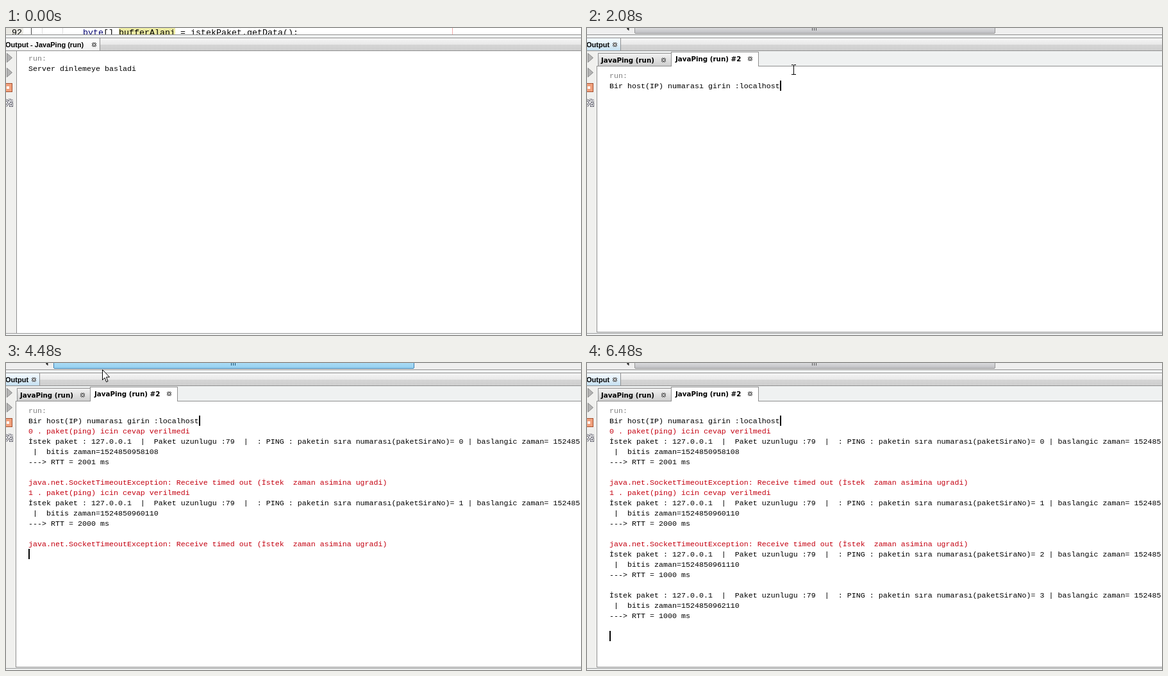
Write an HTML page with a canvas that moves like this. It is 897x479 px and loops after 8 s.

```html
<!DOCTYPE html>
<html lang="tr">
<head>
<meta charset="utf-8">
<title>Ping console</title>
<style>
html, body { margin: 0; width: 100%; height: 100%; overflow: hidden; background: #fff; }
canvas { display: block; }
</style>
</head>
<body>
<canvas id="stage" width="897" height="479"></canvas>
<script>
const c = document.getElementById('stage').getContext('2d');
const LOOP = 8000, W = 897, H = 479;
const MONO = '"Liberation Mono", "Courier New", monospace';
const CODE = '11.66px ' + MONO;
const TITLE = 'bold 11px "Liberation Sans", Arial, sans-serif';
const TAB = 'bold 10.3px "DejaVu Sans", sans-serif';
const RED = '#c40010', GRAY = '#808080';
const PROMPT = 'Bir host(IP) numarası girin :', HOST = 'localhost';

// Each track is a list of [start time, value...]; the last started entry holds.
const typed = [[0, 0], [520, 2], [600, 4], [710, 6], [810, 8], [890, 9]];
const caret = [[0, -1], [1120, 2], [1380, -1], [2550, 8], [3020, -1], [3550, 8],
  [4020, -1], [4480, 14], [5020, -1], [5480, 18], [6020, -1], [6480, 22]];
const heat = [[0, 0], [2940, .1], [3020, .4], [3090, .7], [3170, 1], [3780, .66], [4020, .33],
  [4240, 0], [4410, .6], [4480, 1], [4640, .6], [4720, .3], [4790, 0],
  [5180, .5], [5250, 1], [5480, .6], [5710, .1], [5860, 0]];
const pointer = [[0], [180, beam, 422, 67], [290, beam, 392, 82], [370, beam, 345, 107],
  [450, beam, 306, 121], [1300, beam, 307, 105], [1380, beam, 308, 88], [1700, beam, 309, 84],
  [1780, beam, 309, 76], [1850, beam, 310, 70], [2080, beam, 322, 65], [2150, beam, 362, 45],
  [2230, resize, 420, 15], [2300, resize, 441, 15], [2940, arrow, 455, 8], [3320],
  [4410, arrow, 165, 1], [4480, arrow, 150, 10], [4560, arrow, 128, 19], [4640, arrow, 108, 29],
  [4720, arrow, 96, 36], [4790, arrow, 90, 40], [4870, arrow, 88, 41], [5180, arrow, 96, 12], [5250]];
const packets = [
  [2480, 2, 1524850958108, 2001], [4480, 8, 1524850960110, 2000],
  [5480, 14, 1524850961110, 1000], [6250, 18, 1524850962110, 1000]];

const now = (track, t) => track.filter(k => k[0] <= t).pop();

function box(x, y, w, h, fill) {
  c.fillStyle = fill;
  c.fillRect(x, y, w, h);
}

function shade(x, y, w, h, ...colors) {
  const g = c.createLinearGradient(0, y, 0, y + h);
  colors.forEach((k, i) => g.addColorStop(i / (colors.length - 1), k));
  box(x, y, w, h, g);
}

function text(s, x, y, color = '#000', font = CODE) {
  c.font = font;
  c.fillStyle = color;
  c.fillText(s, x, y);
}

function line(color, width, ...p) {
  c.beginPath();
  for (let i = 0; i < p.length; i += 2) c.lineTo(p[i], p[i + 1]);
  c.strokeStyle = color;
  c.lineWidth = width;
  c.stroke();
}

function poly(fill, stroke, ...p) {
  c.beginPath();
  for (let i = 0; i < p.length; i += 2) c.lineTo(p[i], p[i + 1]);
  c.closePath();
  c.fillStyle = fill;
  c.fill();
  c.strokeStyle = stroke;
  c.lineWidth = 1;
  c.stroke();
}

function beam(x, y) {
  box(x, y - 7, 1, 15, '#000');
  for (const dy of [-8, 7]) {
    box(x - 3, y + dy, 3, 1, '#000');
    box(x + 1, y + dy, 3, 1, '#000');
  }
}

function arrow(x, y) {
  poly('#fff', '#000', x + .5, y + .5, x + .5, y + 16.5, x + 4, y + 13, x + 6.5, y + 19.5,
    x + 9, y + 18.5, x + 6.5, y + 12, x + 11.5, y + 12);
}

function resize(x, y) {
  poly('#fff', '#000', x, y - 10.5, x + 4, y - 6, x + 1.5, y - 6, x + 1.5, y + 6, x + 4, y + 6,
    x, y + 10.5, x - 4, y + 6, x - 1.5, y + 6, x - 1.5, y - 6, x - 4, y - 6);
}

function closeMark(x, y) {
  x += .5;
  for (const [color, w, r] of [['#333', 3.2, 2.6], ['#f4f4f4', 1.1, 2.4]]) {
    line(color, w, x - r, y - r, x + r, y + r);
    line(color, w, x + r, y - r, x - r, y + r);
  }
}

function toolbar(edge) {
  box(0, 36, edge, 440, '#f0f0ee');
  for (const y of [46.5, 69.5]) poly('#b4b4b4', '#8a8a8a', 1.5, y - 7, 9.5, y, 1.5, y + 7);
  box(0, 86, 10, 14, '#a5502f');
  box(0, 87, 9, 12, '#f0a07c');
  box(1, 91, 4, 4, '#fff');
  for (const [color, w] of [['#4a4a58', 3], ['#fff', 1.3]]) {
    line(color, w, 0, 122, 6, 114, 6, 110);
    line(color, w, 6, 114, 11, 113);
    line(color, w, 0, 112, 6, 117);
    c.strokeRect(6.5, 117.5, 3, 4);
  }
}

// Strip with the window title
function header(tabEnd, title, closeX, focused) {
  box(0, 10, W, 1, '#929292');
  box(0, 11, W, 4, '#f0f2f2');
  box(0, 15, W, 1, '#8f8f8f');
  shade(0, 16, W, 10, '#f5f5f5', '#e8e8e8');
  shade(0, 26, W, 9, '#d5d5d5', '#cfcfcf');
  if (focused) shade(0, 16, tabEnd, 19, '#f4faff', '#e2f0fa', '#c4dff0');
  else shade(0, 16, tabEnd, 19, '#fff', '#f0f0f0');
  box(tabEnd, 16, 1, 19, '#8f8f8f');
  box(0, 35, W, 1, '#8f8f8f');
  text(title, -1, 30, '#000', TITLE);
  closeMark(closeX, 26);
}

function editorScene() {
  const font = '13.33px ' + MONO;
  box(0, 0, 27, 10, '#e9e8e2');
  box(39, 0, 1, 10, '#444');
  for (const x of [56, 88]) for (let y = 0; y < 10; y += 2) box(x, y, 1, 1, '#bbb');
  box(696, 0, 1, 10, '#f3a9a9');
  box(176, 0, 88, 10, '#eceba3');
  c.save();
  c.beginPath();
  c.rect(0, 0, W, 10);
  c.clip();
  text('92', 9, 11, '#000', font);
  text('byte', 120, 11, '#00006e', font);
  text('[] bufferAlani = istekPaket.getData();', 152, 11, '#000', font);
  c.restore();
  header(146, 'Output - JavaPing (run)', 137, false);
  toolbar(16);
  box(16, 36, 1, 440, '#8f8f8f');
  box(0, 476, W, 1, '#999');
  box(0, 477, W, 2, '#f0f2f2');
  text('run:', 35, 51, GRAY);
  text('Server dinlemeye basladi', 35, 67);
}

function scrollbar(t) {
  box(0, 0, W, 10, '#efefef');
  const hot = now(heat, t)[1];
  const thumb = (edge, ...fill) => {
    box(74, 0, 563, 8, edge);
    box(75, 8, 561, 1, edge);
    shade(75, 0, 561, 8, ...fill);
  };
  thumb('#979797', '#d9dadc', '#c0c0c4');
  c.globalAlpha = hot;
  thumb('#3c7fb1', '#a9dbf5', '#96d0f0');
  c.globalAlpha = 1;
  for (const x of [351, 354, 357]) box(x, 0, 1, 4, hot > .5 ? '#164e70' : '#555');
  if (t >= 2940 && t < 3320) {
    box(57, 0, 16, 9, '#999');
    box(58, 0, 14, 8, '#e2e2e3');
  }
  poly('#222', '#222', 62.5, 1, 65, -1.5, 65, 3.5);
}

function tabs(t) {
  box(15, 36, W, 23, '#eff1f1');
  box(15, 59, W, 1, '#8f8f8f');
  box(17, 39, 115, 20, '#8f8f8f');
  if (t >= 4790 && t < 5180) shade(18, 40, 113, 19, '#f3faff', '#d0e6f4');
  else shade(18, 40, 113, 19, '#f2f2f2', '#e0e0e0', '#cfcfcf');
  box(131, 37, 137, 23, '#8f8f8f');
  box(132, 38, 135, 23, '#fff');
  text('JavaPing (run)', 22, 54, '#000', TAB);
  closeMark(119, 50);
  text('JavaPing (run) #2', 138, 52, '#000', TAB);
  closeMark(254, 48);
}

const row = (s, i, color) => text(s, 35, 78 + 16 * i, color);
const bar = (x, i) => box(x, 66 + 16 * i, 2, 16, '#000');

function packet([start, at, end, rtt], n) {
  const lost = n < 2;
  if (lost) row(n + ' . paket(ping) icin cevap verilmedi', at++, RED);
  row('İstek paket : 127.0.0.1  |  Paket uzunlugu :79  |  : PING : paketin sıra numarası(paketSiraNo)= '
    + n + ' | baslangic zaman= 152485', at);
  row(' |  bitis zaman=' + end, at + 1);
  row('---> RTT = ' + rtt + ' ms', at + 2);
  if (lost) row('java.net.SocketTimeoutException: Receive timed out (İstek  zaman asimina ugradi)', at + 4, RED);
}

function consoleScene(t) {
  scrollbar(t);
  header(52, 'Output', 43, t >= 450);
  toolbar(15);
  tabs(t);
  box(15, 60, 1, 415, '#8f8f8f');
  box(15, 474, W, 1, '#8f8f8f');
  box(0, 475, W, 4, '#f0f2f2');
  box(0, 476, W, 1, '#999');

  if (t >= 110) row('run:', 0, GRAY);
  if (t >= 220) {
    const s = PROMPT + HOST.slice(0, now(typed, t)[1]);
    row(s, 1);
    if (t >= 450) bar(35 + 7 * s.length, 1);
  }
  packets.forEach((p, n) => { if (t >= p[0]) packet(p, n); });
  const at = now(caret, t)[1];
  if (at >= 0) bar(35, at);

  const [, shape, x, y] = now(pointer, t);
  if (shape) shape(x, y);
}

function draw(ms) {
  const t = ms % LOOP;
  box(0, 0, W, H, '#fff');
  if (t < 70) editorScene();
  else consoleScene(t);
}

const begin = performance.now();
function tick() {
  draw(performance.now() - begin);
  requestAnimationFrame(tick);
}
tick();
</script>
</body>
</html>
```
